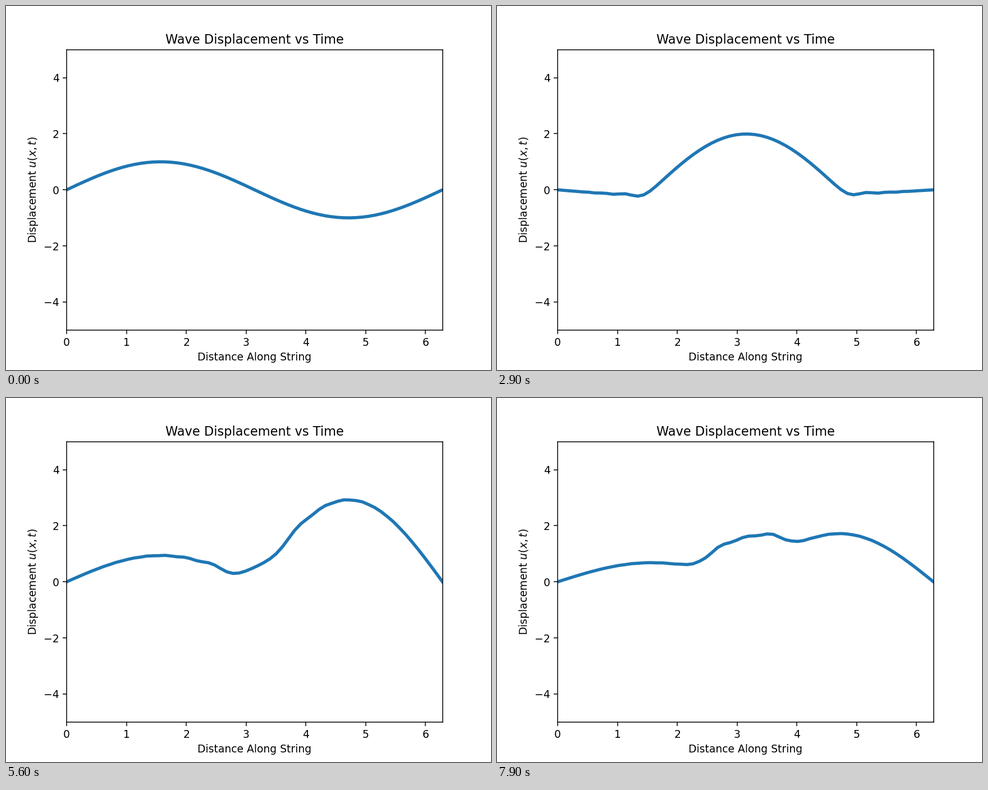
Write a matplotlib script that moves like this. It is 864 px wide and 648 px high and loops after 8000 ms.

```python
import numpy as np
import matplotlib.pyplot as plt
from matplotlib.animation import FuncAnimation

FRAMES, INTERVAL = 80, 100
CELLS = 61
R = 0.25  # squared Courant number

x = np.linspace(0, 2 * np.pi, CELLS + 1)


def curvature(u):
    return u[2:] - 2 * u[1:-1] + u[:-2]


def solve():
    """Leapfrog solution of the wave equation with both ends held at zero."""
    u = np.zeros((FRAMES, CELLS + 1))
    u[0] = np.sin(x)
    # the wave starts out moving right, one cell in the first step
    u[1, 1:-1] = u[0, :-2] + R / 2 * curvature(u[0])
    for n in range(1, FRAMES - 1):
        u[n + 1, 1:-1] = 2 * u[n, 1:-1] - u[n - 1, 1:-1] + R * curvature(u[n])
    return u


waves = solve()

fig, ax = plt.subplots(figsize=(6.4, 4.8), dpi=135)
ax.set(xlim=(0, 2 * np.pi), ylim=(-5, 5),
       title="Wave Displacement vs Time",
       xlabel="Distance Along String",
       ylabel="Displacement $u(x,t)$")
line, = ax.plot(x, waves[0], lw=3)


def update(n):
    line.set_ydata(waves[n])
    return line,


anim = FuncAnimation(fig, update, frames=FRAMES, interval=INTERVAL,
                     repeat=True, repeat_delay=0)
plt.show()
```
